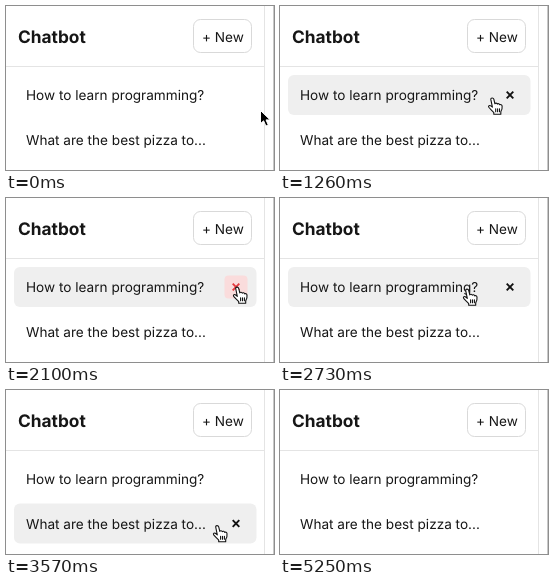
These frames come from a looping animation (268x164 px, 6.37 s). An HTML page:

```html
<!DOCTYPE html>
<html lang="en">
<head>
<meta charset="utf-8">
<title>Chat list</title>
<style>
  html, body { margin: 0; width: 100%; height: 100%; overflow: hidden; background: #fff; }
  svg { display: block; width: 268px; height: 164px; }
  text { font: 13.6px Inter, Roboto, sans-serif; fill: #161616; text-rendering: geometricPrecision; }
  .title { font-size: 17.3px; font-weight: 700; }
  .line { stroke: #e4e4e4; }
  .edge { stroke: #c8c8c8; }
  .bg { fill: #efefef; }
  .danger { fill: #fadcdc; }
  .cross { fill: none; stroke-width: 1.9; }
  .hand { fill: #fff; stroke: #111; stroke-width: 1.1; stroke-linejoin: round; stroke-linecap: round; }
  .arrow { fill: #000; stroke: #fff; }
</style>
</head>
<body>
<svg viewBox="0 0 268 164">
  <path class="line" d="M0 60.5H259M258.5 0V164"/>
  <path class="edge" d="M267.5 0V164"/>
  <text class="title" x="12" y="37">Chatbot</text>
  <rect x="187.5" y="13.5" width="58" height="33" rx="7" fill="#fff" stroke="#d9d9d9"/>
  <text x="196" y="35.5">+ New</text>
  <g id="rows"></g>
  <g id="cursor">
    <path id="arrow" class="arrow" d="M.5 .5V13.6L3.6 10.8L5.9 16L8.3 15L6 9.9H10.2Z"/>
    <g id="hand" class="hand" transform="translate(-4.5 -.5)">
      <path d="M3.2 2C3 .3 5.7 .1 6.2 1.8L7.3 6.4C7.7 5.4 9.4 5.5 9.8 6.7C10.3 6 11.8 6.2 12.2 7.4C12.9 6.9 14.4 7.3 14.5 8.7C14.8 11.2 14.3 12.8 13.2 14.4V16.8H6.2V15.2C4.7 13.4 2.7 11.9 1.2 9.9C.3 8.5 2 7.5 3.2 8.5L4.8 9.8Z"/>
      <path d="M8.1 11.3V14.3M10 11.3V14.3M11.9 11.3V14.3"/>
    </g>
  </g>
</svg>
<script>
const LOOP = 6370, STEP = 70, FADE = 100;
const ROW_H = 40, CROSS_X = 230, CROSS_R = 11.5;
const $ = id => document.getElementById(id);
const mix = (a, b, k) => a + (b - a) * k;
const ease = k => k < .5 ? 2 * k * k : 1 - 2 * (1 - k) ** 2;

function addRow(label, mid) {
  const g = document.createElementNS('http://www.w3.org/2000/svg', 'g');
  const r = CROSS_R;
  g.innerHTML = `
    <rect class="bg" x="8" y="${mid - ROW_H / 2}" width="242.5" height="${ROW_H}" rx="6"/>
    <rect class="danger" x="${CROSS_X - r}" y="${mid - r}" width="${2 * r}" height="${2 * r}" rx="4"/>
    <text x="20" y="${mid + 5}">${label}</text>
    <path class="cross" d="M${CROSS_X - 3.3} ${mid - 3.3}l6.6 6.6m0 -6.6l-6.6 6.6"/>`;
  $('rows').append(g);
  const [bg, danger, , cross] = g.children;
  return { mid, bg, danger, cross };
}

const first = addRow('How to learn programming?', 89);
const second = addRow('What are the best pizza to...', 133.5);
const rows = [first, second];

// pointer stops: beside a delete button, on it, or over the label's end
const beside = row => [211, row.mid + 2];
const over = row => [CROSS_X + 1, row.mid];
const label = row => [187, row.mid + 2];

const entry = [254, 104];
const moves = [
  { from: 0, to: 280, at: [218, 103] },
  { from: 280, to: 560, at: beside(first) },
  { from: 1050, to: 1680, at: [216, 95] },
  { from: 1680, to: 2100, at: over(first) },
  { from: 2380, to: 2730, at: label(first) },
  { from: 2730, to: 3290, at: beside(second) },
  { from: 3570, to: 3850, at: over(second) },
  { from: 4090, to: 4550, at: [275, 140] }
];

function pointerAt(t) {
  let pos = entry;
  for (const { from, to, at } of moves) {
    if (t < from) break;
    const k = ease(Math.min(1, (t - from) / (to - from)));
    pos = pos.map((v, i) => mix(v, at[i], k));
  }
  return pos;
}

const inRow = (row, [x, y]) => x < 250 && Math.abs(y - row.mid) <= ROW_H / 2;
const onCross = (row, [x, y]) =>
  x > CROSS_X - CROSS_R && x < 248 && Math.abs(y - row.mid) <= CROSS_R;

// short fade after each hover change
const level = (test, row, t) =>
  [0, FADE / 2, FADE].reduce((sum, d) => sum + test(row, pointerAt(t - d)), 0) / 3;

function draw(t) {
  const pos = pointerAt(t);
  for (const row of rows) {
    const hover = level(inRow, row, t), red = level(onCross, row, t);
    row.bg.style.opacity = row.cross.style.opacity = hover;
    row.danger.style.opacity = Math.min(hover, red);
    row.cross.style.stroke = `rgb(${[229, 57, 62].map(c => mix(17, c, red))})`;
  }
  const hand = pos[0] < 243 && rows.some(row => inRow(row, pos));
  $('hand').style.display = hand ? '' : 'none';
  $('arrow').style.display = hand ? 'none' : '';
  $('cursor').setAttribute('transform', `translate(${pos})`);
}

const start = performance.now();
function tick() {
  const t = (performance.now() - start) % LOOP;
  draw(Math.floor(t / STEP) * STEP);
  requestAnimationFrame(tick);
}
tick();
</script>
</body>
</html>
```
